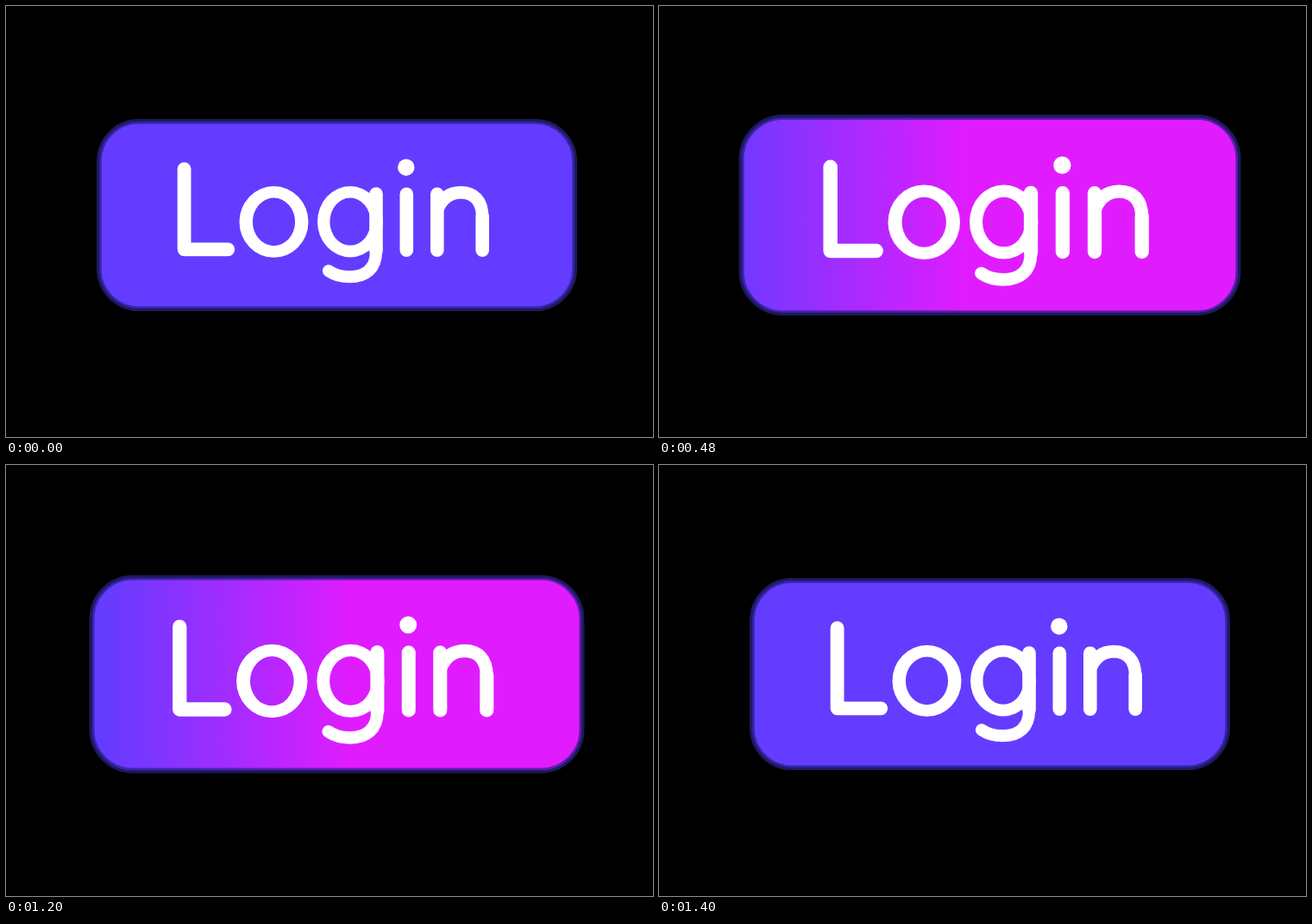
An HTML page with a canvas that plays this animation: 750x500 px, repeating every 1640 ms.

```html
<!DOCTYPE html>
<html lang="en">
<head>
<meta charset="utf-8">
<title>Login button</title>
<style>
  html, body { margin: 0; width: 100%; height: 100%; overflow: hidden; background: #000; }
  canvas { display: block; width: 750px; height: 500px; }
</style>
</head>
<body>
<canvas id="stage" width="750" height="500" role="img" aria-label="Login">Login</canvas>
<script>
const ctx = document.getElementById('stage').getContext('2d');
const LOOP = 1640, STEP = 40;
const CENTER = { x: 383.5, y: 242.6 };
const BOX = { x: 105, y: 131.1, w: 557, h: 223, r: 49 };
const BLUE = '#643cff', PINK = '#e01cff';
const BLEND = 0.5; // width of the colour blend, as a share of the button

// Letter strokes, drawn with round caps
const STROKES = [
  [15.8, 'M206.6 189.2V282.3H257.3'],
  [15.6, 'M429 218V284'],
  [14.2, 'M429 282V285C429 304 417.5 314.2 398 314.2C388 314.2 381 312 374 307.3'],
  [15.6, 'M464.3 218.3V283.2'],
  [15.6, 'M499.8 218.3V283.2'],
  [14.6, 'M499.8 237C505 223.5 514 216.4 527 216.4C543 216.4 552.2 226 552.2 245'],
  [15.6, 'M552.2 244V283.2']
].map(([width, d]) => ({ width, path: new Path2D(d) }));

function bezier(x1, y1, x2, y2) {
  const at = (a, b, u) => 3 * a * u * (1 - u) ** 2 + 3 * b * u * u * (1 - u) + u ** 3;
  return x => {
    if (x <= 0) return 0;
    if (x >= 1) return 1;
    let lo = 0, hi = 1;
    for (let i = 0; i < 24; i++) {
      const mid = (lo + hi) / 2;
      if (at(x1, x2, mid) < x) lo = mid; else hi = mid;
    }
    return at(y1, y2, lo);
  };
}
const ease = bezier(0.25, 0.1, 0.25, 1);
const easeInOut = bezier(0.42, 0, 0.58, 1);

const hoverScale = t => ease((t - 296) / 300) - easeInOut((t - 1068) / 300);
const hoverColor = t => ease((t - 295) / 450) - easeInOut((t - 1070) / 315);

function box(inset) {
  ctx.beginPath();
  ctx.roundRect(BOX.x + inset, BOX.y + inset, BOX.w - 2 * inset, BOX.h - 2 * inset, BOX.r - inset);
}

function border(inset, width, color) {
  box(inset + width / 2);
  ctx.lineWidth = width;
  ctx.strokeStyle = color;
  ctx.stroke();
}

function ring(x, y, rx, ry, innerX, innerY) {
  ctx.beginPath();
  ctx.ellipse(x, y, rx, ry, 0, 0, Math.PI * 2);
  ctx.closePath();
  ctx.moveTo(x + innerX, y);
  ctx.ellipse(x, y, innerX, innerY, 0, 0, Math.PI * 2);
  ctx.fill('evenodd');
}

function drawButton(p) {
  const end = BOX.x + BOX.w * (1 + BLEND) * (1 - p);
  const fill = ctx.createLinearGradient(end - BOX.w * BLEND, 0, end, 0);
  fill.addColorStop(0, BLUE);
  fill.addColorStop(1, PINK);
  box(1);
  ctx.fillStyle = fill;
  ctx.fill();
  border(0, 3.4, '#1d1a5f');
  border(3.2, 2.5, 'rgba(32, 28, 130, 0.68)');
}

function drawLabel() {
  ctx.fillStyle = ctx.strokeStyle = '#fff';
  ctx.lineCap = ctx.lineJoin = 'round';
  for (const s of STROKES) {
    ctx.lineWidth = s.width;
    ctx.stroke(s.path);
  }
  ring(310.5, 250.4, 40, 41.4, 24.6, 27.8);
  ring(399, 250.2, 38, 41.2, 23.6, 27.6);
  ctx.beginPath();
  ctx.arc(463.8, 187.2, 9.7, 0, Math.PI * 2);
  ctx.fill();
}

function draw(t) {
  const scale = 1 + 0.05 * hoverScale(t);
  ctx.fillStyle = '#000';
  ctx.fillRect(0, 0, 750, 500);
  ctx.save();
  ctx.translate(CENTER.x, CENTER.y);
  ctx.scale(scale, scale);
  ctx.translate(-CENTER.x, -CENTER.y);
  drawButton(hoverColor(t));
  drawLabel();
  ctx.restore();
}

const start = performance.now();
function tick() {
  const t = (performance.now() - start) % LOOP;
  draw(Math.floor(t / STEP) * STEP);
  requestAnimationFrame(tick);
}
tick();
</script>
</body>
</html>
```
